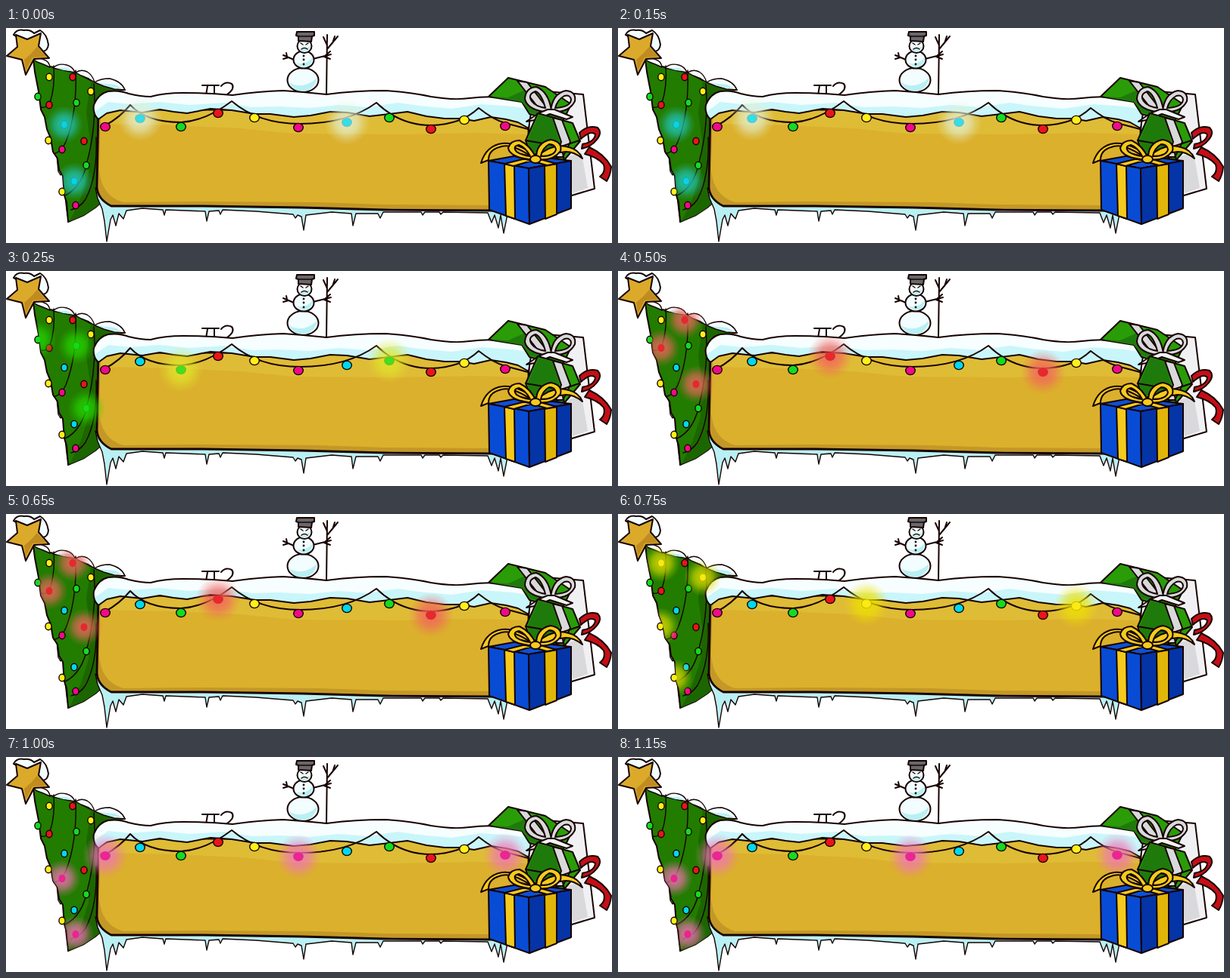
An HTML page for the animation above (1.25 s loop, 800 by 285 pixels).

```html
<!DOCTYPE html>
<html lang="en">
<head>
<meta charset="utf-8">
<title>Winter banner</title>
<style>
  html, body { margin: 0; width: 100%; height: 100%; overflow: hidden; background: #fff; }
  svg { display: block; width: 800px; height: 285px; }
  .ink { stroke: #170200; stroke-width: 2; stroke-linejoin: round; stroke-linecap: round; }
  .thin { stroke-width: 1.4; }
  .bold { stroke-width: 2.8; }
  .line { fill: none; }
  .ice { fill: #b9f0f4; }
  .snow { fill: #f2fdff; }
  .green { fill: #2a9c08; }
  .dark { fill: #1f7a0c; }
  .white { fill: #f1f1f3; }
  .grey { fill: #d9d9dc; }
  .yellow { fill: #f4cb1c; }
</style>
</head>
<body>
<svg viewBox="0 0 800 285">
  <defs>
    <path id="tree" d="M36 41L58 51 91 58 117 72 157 82 128 86 122 100 120 214 127 230 118 238 103 248 82 257 80 231 77 222 75 196 70 188 68 173 62 164 59 146 54 134 51 118 46 108 43 84 38 58Z"/>
    <path id="treeSnow" d="M37 42Q43 38 50 42Q57 44 58 52L49 48 41 45ZM62 53Q69 46 80 49Q88 51 91 59L80 57 72 55ZM92 59Q99 54 107 58Q114 62 117 72L109 67 99 63ZM117 72Q124 67 137 67Q153 71 157 82L143 81 129 77Z"/>
    <path id="board" d="M122 108L690 108 690 238 641 242 500 241 390 238 260 236 139 236Q121 227 120 211Z"/>
    <path id="snow" d="M122 121Q114 114 116 102Q122 87 135 84Q149 82 162 87Q178 91 191 91Q209 86 234 86Q267 86 299 89Q333 84 366 83Q396 85 423 88Q461 83 500 83Q533 85 561 91Q591 96 612 93Q642 89 672 94Q690 98 693 113L690 133 676 125 660 121 640 118 618 123 599 120 579 120 555 117 530 111 506 114 480 117 450 112 428 111 402 116 380 118 349 114 329 114 298 109 270 107 239 113 221 111 203 108 180 112 151 109 133 113Z"/>
    <clipPath id="art"><use href="#tree"/><use href="#treeSnow"/><use href="#board"/><use href="#snow"/></clipPath>
    <clipPath id="inTree"><use href="#tree"/></clipPath>
    <clipPath id="inBoard"><use href="#board"/></clipPath>
    <clipPath id="inSnow"><use href="#snow"/></clipPath>
  </defs>

  <!-- tree -->
  <path class="ink thin ice" d="M58 142L63 166 66 158 69 190 72 195 75 186 78 223 81 249 86 230 75 160Z"/>
  <use href="#tree" class="ink" fill="#227c00"/>
  <path clip-path="url(#inTree)" fill="#1c6600" d="M112 70L160 78 130 140 128 250 82 260 98 227 109 193 111 150 106 112Z"/>
  <path class="ink thin line" d="M63 50Q65 78 58 99Q53 107 46 105M92 56Q94 113 79 151Q73 164 65 166M116 74Q120 126 108 174Q101 211 78 222M119 145Q121 197 105 227Q98 238 86 241"/>
  <use href="#treeSnow" class="ink thin snow"/>
  <path class="ice" d="M66 53L80 53 88 57 76 56ZM122 73L144 75 153 80 140 79Z"/>

  <!-- star -->
  <path class="ink snow" d="M10 9Q14 1 24 3Q32 2 37 7L45 3Q54 8 56 22Q55 30 49 31L39 24Z"/>
  <path class="ink" fill="#dcaa2b" d="M13 9L28 15 46 7 43 24 57 40 37 41 26 62 21 42 1 37 15 25Z"/>
  <path fill="#c08c20" d="M41 25L53 38 35 39 26 57 24 42 33 34Z"/>

  <!-- marks behind the snow -->
  <path class="ink line" d="M259 76L281 76M266 77L264 89M275 77L275 90M284 77Q290 70 298 74Q303 80 292 88"/>

  <!-- snowman -->
  <path class="ink line" d="M424 9L423 88M424 28L438 11M431 20L434 11M424 23L419 12M380 42L366 36M373 39L366 41M371 38L370 33M405 41L429 35M421 37L428 31M420 38L428 41"/>
  <g class="ink snow">
    <ellipse cx="392" cy="69" rx="20.5" ry="16"/>
    <ellipse cx="393" cy="42" rx="13.5" ry="11.5"/>
    <ellipse cx="394" cy="24" rx="9.5" ry="9"/>
  </g>
  <path class="ice" d="M374 72Q391 83 411 66Q406 84 390 84Q379 83 374 72ZM382 46Q394 51 405 39Q404 52 392 52ZM386 27Q394 31 402 23Q400 32 391 31Z"/>
  <path class="ink" fill="#68686c" d="M384 5L407 5 407 10 404 11 403 18 386 17 386 11 383 10Z"/>
  <path class="ink thin line" d="M386 11L404 11M389 20L392 22M399 20L396 22M390 28Q394 25 398 28"/>
  <path class="ink bold line" d="M393 37v0M393 42v0M393 48v0"/>

  <!-- board and ice -->
  <path class="ink thin ice" d="M118 212L121 226 127 240 130 256 133 283 138 254 141 248 145 262 149 246 155 253 159 242 180 239 207 241 209 248 211 241 263 243 265 256 268 243 281 242 283 247 286 241 330 243 379 247 382 252 385 248 390 250 393 268 396 248 430 244 456 246 458 262 462 246 491 246 494 252 498 244 548 244 550 248 553 244 572 244 574 247 577 244 636 245 641 258 645 248 650 265 653 248 657 272 663 242 640 234 140 230Z"/>
  <use href="#board" fill="#dbb02c"/>
  <g clip-path="url(#inBoard)">
    <path fill="#dfbc36" d="M124 107H690V141L620 139 520 141 380 140 310 133 220 129 126 127Z"/>
    <path fill="#c49826" d="M118 108L125 112 123 188Q126 223 155 231L260 230 410 231 500 234 641 235 690 230V245H118Z"/>
  </g>
  <use href="#board" class="ink bold line"/>
  <use href="#snow" fill="#c9f6fa"/>
  <path clip-path="url(#inSnow)" fill="#f7feff" d="M112 80H695V108L669 104 628 101 588 107 545 103 517 99 479 105 439 102 401 106 361 104 325 105 288 99 242 102 202 98 164 101 135 98 118 110Z"/>
  <use href="#snow" class="ink line"/>
  <path class="ink line" d="M131 129Q150 119 164 102Q185 125 231 125Q264 123 298 97Q333 127 388 127Q451 127 489 99Q520 129 561 129Q601 128 624 106Q644 122 659 126L689 134"/>

  <g id="bulbs"></g>
  <g id="glows" clip-path="url(#art)"></g>

  <!-- presents -->
  <path class="ink white" d="M713 84L762 88 777 213 747 222 720 212Z"/>
  <path class="grey" d="M742 170L760 166 768 212 748 219Z"/>
  <path class="ink" fill="#c50f16" d="M757 139Q768 128 781 132Q788 139 779 149Q773 157 760 160L761 154Q777 151 778 141Q772 135 759 147ZM770 158Q790 167 799 184Q798 195 793 203L784 197Q792 191 789 181Q781 171 764 167Z"/>
  <path class="ink green" d="M637 91L663 66 712 78 746 101 734 126 691 114 681 98Z"/>
  <path class="dark" d="M640 91L663 92 690 80 711 104 733 123 692 112 681 98Z"/>
  <path class="ink grey" d="M675 70L688 72 716 108 710 115Z"/>
  <path class="ink grey" fill-rule="evenodd" d="M717 112Q688 109 685 94Q686 79 700 78Q716 84 720 109ZM712 106Q707 87 699 84Q688 88 694 97Q699 104 712 106ZM719 111Q721 87 739 83Q753 84 751 97Q743 113 719 111ZM725 106Q745 105 746 95Q745 88 737 90Q728 95 725 106Z"/>
  <path class="ink white" d="M715 108L703 113 687 124 698 122 718 114 740 121 748 118 724 108Z"/>
  <path class="ink green" d="M702 113L748 126 758 150 737 175 692 166 686 149Z"/>
  <path class="dark" d="M703 115L722 120 732 156 734 172 693 164 688 150Z"/>
  <path class="ink grey" d="M722 119L734 122 745 151 735 171 726 171 733 151Z"/>
  <path class="ink line" d="M686 149L733 157 757 149M733 157L737 175"/>
  <path class="ink" fill="#0d50d8" d="M637 176L681 168 746 176 690 186Z"/>
  <path class="ink" fill="#084cd5" d="M637 176L690 186 691 260 638 241Z"/>
  <path class="ink" fill="#0434a6" d="M690 186L746 176 746 239 691 260Z"/>
  <path class="ink yellow" d="M658 180L671 183 672 253 660 249Z"/>
  <path class="ink" fill="#e2b608" d="M711 183L727 180 727 247 712 253Z"/>
  <path class="ink yellow" d="M658 180L706 168 714 170 670 183ZM672 170L680 167 727 180 714 182Z"/>
  <path class="ink yellow" d="M697 173Q667 151 651 158Q637 162 637 175L627 179Q634 156 655 153Q674 151 700 170ZM700 171Q723 151 743 158Q756 161 761 173Q750 164 739 164Q720 165 701 177Z"/>
  <path class="ink yellow" fill-rule="evenodd" d="M697 175Q665 172 663 159Q666 149 678 149Q693 156 700 173ZM692 170Q686 158 677 155Q668 157 674 164Q681 169 692 170ZM700 174Q699 152 719 148Q735 151 732 163Q722 177 700 174ZM706 170Q724 170 726 161Q725 154 717 154Q708 159 706 170Z"/>
  <ellipse class="ink yellow" cx="699" cy="174" rx="7" ry="5"/>
</svg>

<script>
  const STEP = 250;
  const WIRE = { r: 30, rx: 6.3, ry: 5.6 };
  const TREE = { r: 25, rx: 4.1, ry: 4.8 };
  // Bulb colour, halo and positions on the wire, halo and positions on the tree
  const groups = [
    ["#00d8ee", "#e2efd0", [[177,120],[450,125]], "#22c6c0", [[77,128],[90,203]]],
    ["#12dc20", "#dfe62a", [[231,131],[506,119]], "#24d400", [[42,91],[93,99],[106,182]]],
    ["#e9141c", "#f3635c", [[280,113],[561,134]], "#ee655c", [[88,65],[57,102],[103,150]]],
    ["#fff019", "#eee000", [[328,119],[605,122]], "#dcdc00", [[57,65],[112,84],[56,149],[74,217]]],
    ["#f0098a", "#f175b5", [[131,131],[386,132],[659,130]], "#ee70b0", [[74,161],[92,235]]]
  ];
  const NS = "http://www.w3.org/2000/svg";
  const add = (parent, tag, attrs) => {
    const node = document.createElementNS(NS, tag);
    for (const key in attrs) node.setAttribute(key, attrs[key]);
    return parent.appendChild(node);
  };
  const defs = document.querySelector("defs");
  const bulbs = document.getElementById("bulbs");
  const glows = document.getElementById("glows");

  function addLights(layer, color, halo, spots, { r, rx, ry }) {
    const id = "glow" + halo.slice(1);
    const grad = add(defs, "radialGradient", { id });
    for (const [offset, alpha] of [[0, .85], [.3, .75], [.5, .6], [.75, .25], [1, 0]])
      add(grad, "stop", { offset, "stop-color": halo, "stop-opacity": alpha });
    for (const [cx, cy] of spots) {
      add(bulbs, "ellipse", { cx, cy, rx, ry, fill: color, class: "ink thin" });
      add(layer, "circle", { cx, cy, r, fill: `url(#${id})` });
      add(layer, "ellipse", { cx, cy, rx, ry, fill: color, opacity: .7 });
    }
  }

  const layers = groups.map(([color, wireHalo, wire, treeHalo, tree]) => {
    const layer = add(glows, "g", {});
    addLights(layer, color, wireHalo, wire, WIRE);
    addLights(layer, color, treeHalo, tree, TREE);
    return layer;
  });

  function draw() {
    const active = Math.floor(performance.now() / STEP) % layers.length;
    layers.forEach((layer, i) => layer.setAttribute("visibility", i === active ? "visible" : "hidden"));
    requestAnimationFrame(draw);
  }
  draw();
</script>
</body>
</html>
```
